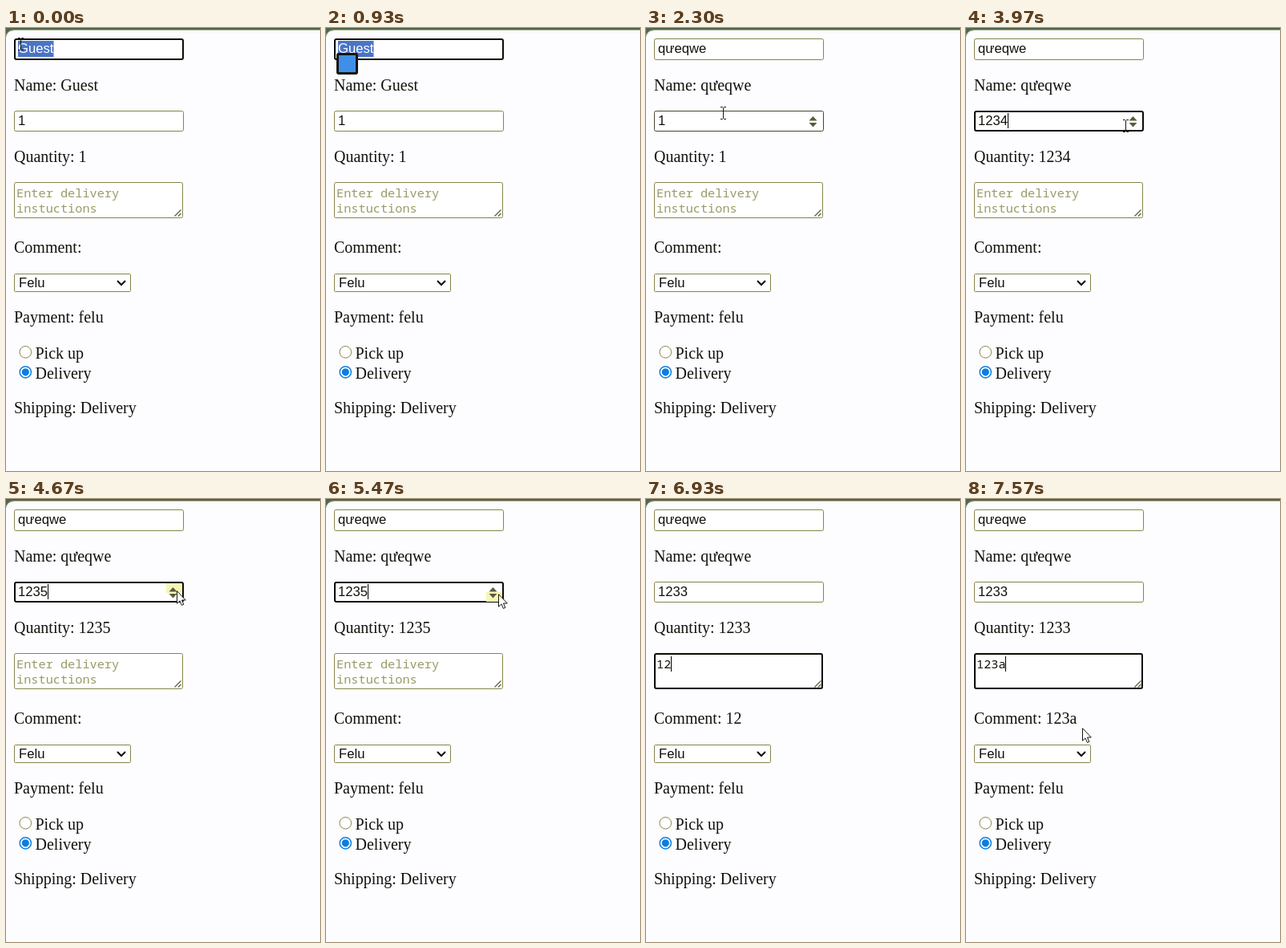
An HTML page that plays this animation: 392x552 px, repeating every 8000 ms.

```html
<!DOCTYPE html>
<html lang="en">
<head>
<meta charset="utf-8">
<title>Form bindings</title>
<style>
  html, body { margin: 0; width: 100%; height: 100%; overflow: hidden; background: #fdfcfe; }
  svg { display: block; width: 392px; height: 552px; }
  text { fill: #12120c; white-space: pre; }
  .label { font: 20px "Liberation Serif", serif; }
  .field { font: 16.67px "Liberation Sans", sans-serif; }
  .mono { font: 15.28px "Noto Sans Mono", monospace; }
  .hint { fill: #9a9a68; }
  .box { fill: #fff; stroke: #85854c; }
  .box.hover { stroke: #45452c; }
  .box.focus { stroke: #0c0c04; stroke-width: 2; }
  .spin { fill: #5a5a42; }
  .caret { fill: #000; }
</style>
</head>
<body>
<svg viewBox="0 0 392 552">
  <rect width="392" height="552" fill="#fdfcfe"/>
  <path d="M0 0H392V3H10Q2 3 0 11Z" fill="#4d664d"/>
  <path d="M0 10Q2 2.5 10 2.5H392" fill="none" stroke="#a3a878"/>

  <rect id="nameBox" rx="2"/>
  <rect id="selection" x="15" y="16" width="44.5" height="20" fill="#4a74c6"/>
  <text id="nameText" class="field" x="15" y="31"></text>
  <text id="nameLabel" class="label" x="10" y="78"></text>

  <rect id="countBox" rx="2"/>
  <rect id="spinHover" x="200" width="19" height="12" fill="#f6f6b4"/>
  <path id="spinner" class="spin" d="M203.5 115.5L208.5 110L213.5 115.5ZM203.5 118L208.5 123.5L213.5 118Z"/>
  <text id="countText" class="field" x="15" y="121"></text>
  <text id="countLabel" class="label" x="10" y="167"></text>

  <rect id="noteBox" rx="2"/>
  <path d="M210.5 234.5L218.5 226.5M215 234.5L218.5 231" stroke="#5c5c44" stroke-width="1.2"/>
  <g id="hint">
    <text class="mono hint" x="13" y="211">Enter delivery</text>
    <text class="mono hint" x="13" y="230">instuctions</text>
  </g>
  <text id="noteText" class="mono" x="13" y="211"></text>
  <text id="noteLabel" class="label" x="10" y="280"></text>

  <rect class="box" x="10.5" y="306.5" width="145" height="22" rx="1"/>
  <text class="field" x="16" y="323">Felu</text>
  <path d="M139 315L144 320L149 315" fill="none" stroke="#0c0c08" stroke-width="2"/>
  <text class="label" x="10" y="367">Payment: felu</text>

  <circle class="box" cx="24.3" cy="403.8" r="7.3"/>
  <text class="label" x="36.5" y="412">Pick up</text>
  <circle cx="24.3" cy="428.8" r="7.1" fill="#fff" stroke="#0a7ee0" stroke-width="1.5"/>
  <circle cx="24.3" cy="428.8" r="4.6" fill="#0a7ee0"/>
  <text class="label" x="36.5" y="437">Delivery</text>
  <text class="label" x="10" y="480">Shipping: Delivery</text>

  <rect id="caret" class="caret" width="1"/>
  <g id="popup">
    <rect x="13" y="31" width="27" height="27" rx="3" fill="#15150f"/>
    <rect x="16" y="34" width="21" height="21" fill="#3f8fe8"/>
  </g>
  <path id="beam" d="M-3.5 -7.5H-1L0 -6.5L1 -7.5H3.5M0 -6.5V6.5M-3.5 7.5H-1L0 6.5L1 7.5H3.5" fill="none" stroke="#16160e"/>
  <path id="arrow" d="M.5 .7V16.2L4 12.9L6.4 18.4L8.8 17.4L6.5 12H11.3Z" fill="#fff" stroke="#16160e"/>
</svg>
<script>
const LOOP = 8000;
const el = id => document.getElementById(id);
const show = (id, on) => el(id).setAttribute('visibility', on ? 'visible' : 'hidden');
const setAttrs = (node, attrs) => Object.entries(attrs).forEach(([k, v]) => node.setAttribute(k, v));

// Timelines: [start, value]
const names = [[0, 'Guest'], [1300, 'q'], [1350, 'qư'], [1400, 'qưe'], [1470, 'qưeq'], [1530, 'qưeqw'], [1570, 'qưeqwe']];
const counts = [[0, '1'], [3330, '12'], [3530, '123'], [3970, '1234'], [4600, '1235'],
  [4900, '1236'], [5370, '1235'], [5630, '1234'], [5930, '1233']];
const notes = [[0, ''], [6670, '1'], [6930, '12'], [7130, '123'], [7500, '123a']];
const focuses = [[0, 'name'], [1630, ''], [2430, 'count'], [6470, 'note']];

// Pointer strokes: shape, start, end, then waypoints [time, x, y]
const strokes = [
  ['beam', 0, 400, [100, 18, 20], [400, -8, 24]],
  ['beam', 2000, 3330, [2000, 80, 31], [2170, 82, 36], [2300, 96, 106], [2540, 96, 106], [2570, 101, 106]],
  ['beam', 3970, 4270, [4030, 199, 122], [4270, 205, 119]],
  ['arrow', 4270, 6440, [4270, 206, 117], [4500, 213, 114], [4960, 213, 114], [5130, 214, 118],
    [5370, 214, 118], [5470, 215, 118], [5770, 214, 119], [5930, 214, 119], [6030, 273, 168],
    [6300, 273, 168], [6440, 208, 190]],
  ['beam', 6440, 6670, [6440, 206, 196], [6500, 130, 214]],
  ['arrow', 7300, LOOP, [7300, 136, 262], [7570, 145, 285]],
];

const fields = {
  name: { x: 10, y: 13, w: 212, h: 27, steps: names, label: 'Name: ', caretY: 17 },
  count: { x: 10, y: 103, w: 212, h: 26, steps: counts, label: 'Quantity: ', caretY: 106 },
  note: { x: 10, y: 192, w: 211, h: 45, steps: notes, label: 'Comment: ', caretY: 196 },
};

const current = (steps, t) => steps.findLast(([start]) => t >= start);

function position(points, t) {
  const next = points.findIndex(p => p[0] > t);
  if (next === 0) return points[0].slice(1);
  if (next < 0) return points.at(-1).slice(1);
  const [a, b] = [points[next - 1], points[next]];
  const k = (t - a[0]) / (b[0] - a[0]);
  return [a[1] + (b[1] - a[1]) * k, a[2] + (b[2] - a[2]) * k];
}

function drawField(key, t, focused) {
  const f = fields[key];
  const value = current(f.steps, t)[1];
  const inset = focused ? 1 : 0.5;
  const hovered = key === 'count' && t >= 2230 && t < 2430;
  setAttrs(el(key + 'Box'), {
    x: f.x + inset, y: f.y + inset, width: f.w - 2 * inset, height: f.h - 2 * inset,
    class: 'box' + (focused ? ' focus' : hovered ? ' hover' : ''),
  });
  el(key + 'Text').textContent = value;
  el(key + 'Label').textContent = f.label + value;
}

function drawCaret(t, [focusedAt, key]) {
  const f = fields[key];
  const selected = t < 1300;
  if (!f || selected) return show('caret', false);
  const since = t - Math.max(focusedAt, current(f.steps, t)[0]);
  const text = el(key + 'Text');
  const width = text.textContent ? text.getComputedTextLength() : 0;
  setAttrs(el('caret'), { x: Math.round(+text.getAttribute('x') + width - 0.5), y: f.caretY, height: 19 });
  show('caret', since % 1000 < 500);
}

function render(t) {
  const focus = current(focuses, t);
  for (const key in fields) drawField(key, t, focus[1] === key);
  drawCaret(t, focus);

  const selected = t < 1300;
  show('selection', selected);
  el('nameText').style.fill = selected ? '#fff' : '';
  show('popup', t >= 930 && t < 1300);
  show('hint', t < 6670);

  show('spinner', t >= 2230 && t < 6470);
  show('spinHover', t >= 4270 && t < 5960);
  el('spinHover').setAttribute('y', t < 5070 ? 105 : 116);

  const stroke = strokes.find(([, start, end]) => t >= start && t < end);
  for (const shape of ['beam', 'arrow']) {
    const on = stroke?.[0] === shape;
    show(shape, on);
    if (on) {
      const [x, y] = position(stroke.slice(3), t).map(Math.round);
      const half = shape === 'beam' ? 0.5 : 0;
      el(shape).setAttribute('transform', `translate(${x + half} ${y})`);
    }
  }
}

const origin = performance.now();
function tick() {
  render((performance.now() - origin) % LOOP);
  requestAnimationFrame(tick);
}
tick();
</script>
</body>
</html>
```
